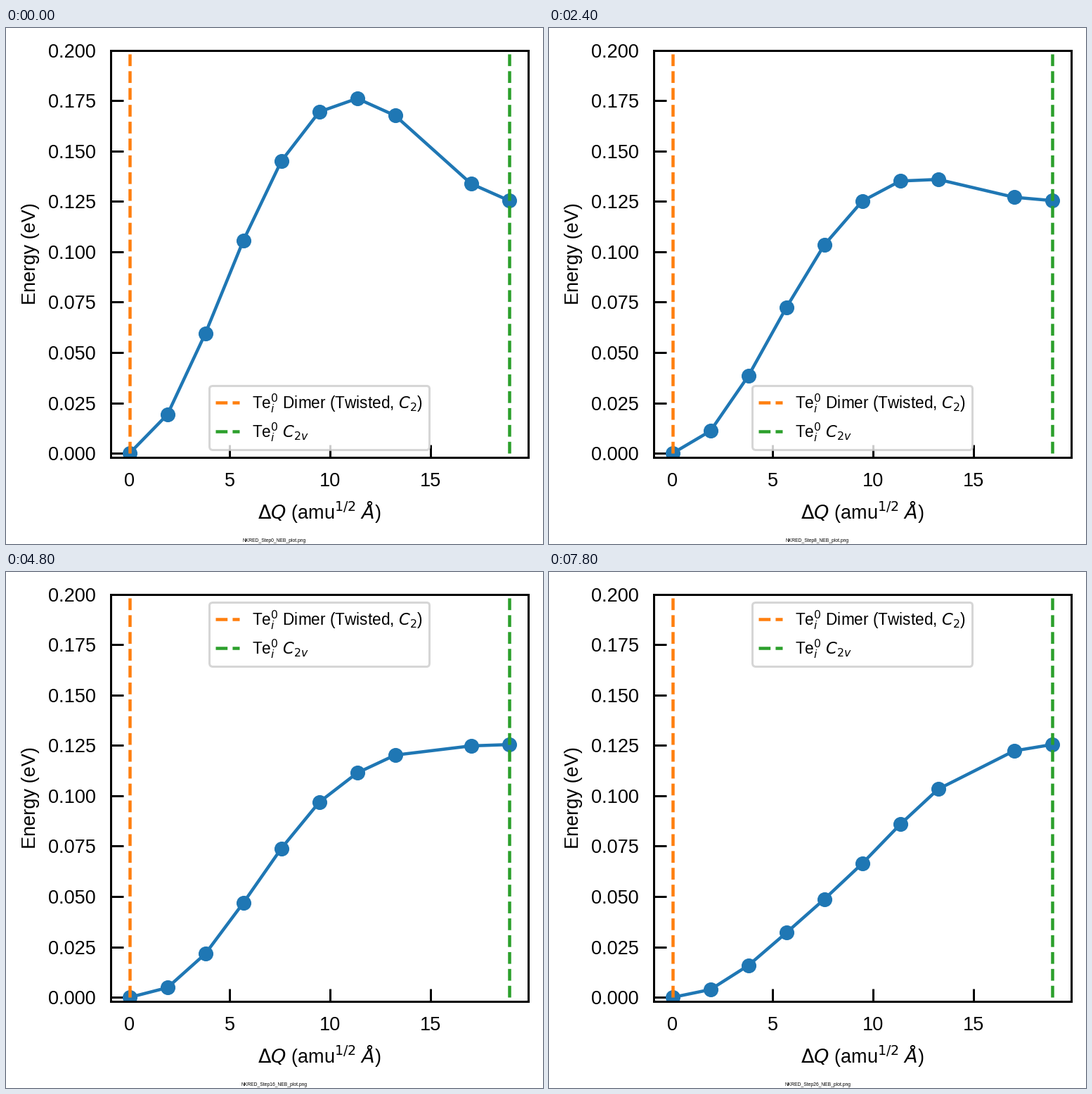
These frames come from a looping animation (764x733 px, 8000 ms). A matplotlib script:

```python
import numpy as np
import matplotlib.pyplot as plt
from matplotlib.animation import FuncAnimation

W, H, DPI = 764, 733, 72     # at 72 dpi one point is one pixel
STEP_FRAMES = 3              # each step is held for 300 ms
FRAMES, INTERVAL = 80, 100
PT = 3.01                    # pixels per nominal point

plt.rcParams.update({
    "font.family": "Liberation Sans",
    "font.size": 9 * PT,
    "axes.linewidth": PT,
    "axes.labelpad": 4 * PT,
    "patch.linewidth": PT,
    "lines.linewidth": 1.5 * PT,
    "lines.markersize": 6 * PT,
    "lines.markeredgewidth": PT,
})
for tick in ("xtick", "ytick"):
    plt.rcParams.update({
        f"{tick}.direction": "in",
        f"{tick}.major.size": 6 * PT,
        f"{tick}.major.width": PT,
        f"{tick}.major.pad": 7 * PT,
    })

Q_END, E_END = 18.93, 0.1254
IMAGE = np.delete(np.arange(11), 8)   # one image of the path is missing
X = IMAGE / 10
Q = Q_END * X


def hump(height, skew, power):
    return height * np.sin(np.pi * X ** skew) ** power


RAMP = E_END * X ** 2 * (3 - 2 * X)
START = RAMP + hump(0.107, 0.95, 1.8)
EARLY = RAMP + hump(0.069, 0.92, 2)
RELAXED = RAMP + 0.0048 * np.sin(np.pi * X) - 0.0011 * np.sin(5 * np.pi * X)


def energies(step):
    """A quick drop, then a slow one that settles sooner at low Q."""
    quick = max(0, 1 - step / 4) ** 2
    settled = np.minimum(26, 16.5 + 2 * IMAGE)
    progress = np.clip((step - 3) / (settled - 3), 0, 1)
    slow = (0.5 + 0.5 * np.cos(np.pi * progress)) ** 0.82
    return RELAXED + slow * (EARLY - RELAXED) + quick * (START - EARLY)


fig = plt.figure(figsize=(W / DPI, H / DPI), dpi=DPI, facecolor="white")
ax = fig.add_axes([148.7 / W, 1 - 610 / H, 594 / W, 578.5 / H])
ax.set_xlim(-0.05 * Q_END, 1.05 * Q_END)
ax.set_ylim(-0.002, 0.2)
ax.set_xticks([0, 5, 10, 15])
ax.set_yticks(np.arange(9) * 0.025)
ax.set_xlabel(r"$\Delta Q$ (amu$^{1/2}$ $Å$)")
ax.set_ylabel("Energy (eV)")

path, = ax.plot(Q, energies(0), "o-", color="C0")
for q, color, label in [(0, "C1", r"Te$_i^0$ Dimer (Twisted, $C_2$)"),
                        (Q_END, "C2", r"Te$_i^0$ $C_{2v}$")]:
    ax.plot([q, q], [0, 0.2], "--", color=color, label=label)

legend = ax.legend(handles=ax.lines[1:], loc="lower center", fontsize="small",
                   handlelength=1.5, labelspacing=0.42)
LEGEND_CORNER = (3.926, 0.0329)   # top left of the lower legend box

caption = fig.text(0.5, 3 / H, "", fontsize=6.8, ha="center", va="baseline")


def update(frame):
    step = frame // STEP_FRAMES
    e = energies(step)
    path.set_ydata(e)
    # The legend jumps to the top once the curve would run through it
    q, top = LEGEND_CORNER
    legend.set_loc("lower center" if np.interp(q, Q, e) > top else "upper center")
    caption.set_text(f"NKRED_Step{step}_NEB_plot.png")
    return path, legend, caption


anim = FuncAnimation(fig, update, frames=FRAMES, interval=INTERVAL,
                     repeat=True, repeat_delay=0, blit=False)
plt.show()
```
